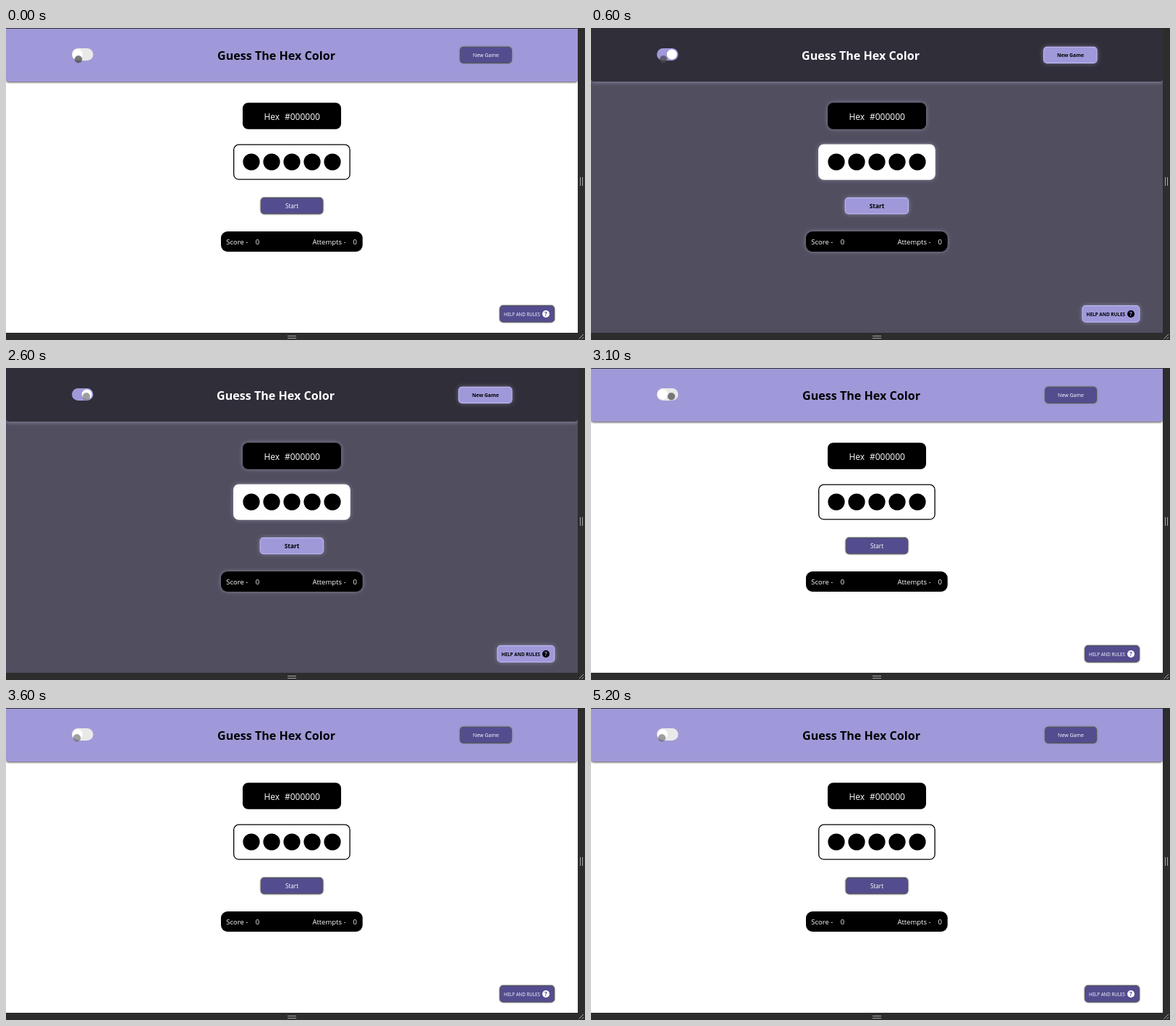
These frames come from a looping animation (800 px wide and 431 px high, 5600 ms). An HTML page:

```html
<!DOCTYPE html>
<html lang="en">
<head>
<meta charset="utf-8">
<title>Guess The Hex Color</title>
<style>
  html, body { margin: 0; height: 100%; overflow: hidden; background: #2d2d2d; }
  svg { display: block; width: 100vw; height: 100vh; font-family: "Open Sans", "Noto Sans", sans-serif; }
  text { white-space: pre; }
  .light .header { filter: drop-shadow(0 1.5px 1.5px #444); }
  .light .button { filter: drop-shadow(0 0 .8px #777); }
  .dark .header { filter: drop-shadow(0 2px 2.5px #aaa6c080); }
  .dark .glow, .dark .button { filter: drop-shadow(0 0 3px #c8c4e470); }
</style>
</head>
<body>
<svg id="stage" viewBox="0 0 800 431" preserveAspectRatio="none"></svg>
<script>
const LOOP = 5600;
const stage = document.getElementById("stage");

const rect = (x, y, w, h, r, fill, extra = "") =>
  `<rect x="${x}" y="${y}" width="${w}" height="${h}" rx="${r}" fill="${fill}" ${extra}/>`;
const circle = (x, y, r, fill) => `<circle cx="${x}" cy="${y}" r="${r}" fill="${fill}"/>`;
const label = (text, x, y, size, fill, weight = 400, anchor = "middle") =>
  `<text x="${x}" y="${y}" font-size="${size}" fill="${fill}" font-weight="${weight}" text-anchor="${anchor}">${text}</text>`;
const white = (text, x, y, size) => label(text, x, y, size, "#fff", 400, "start");

const themes = {
  light: {
    page: "#fff", header: "#9f99d9", title: "#000", titleX: 373.5,
    track: "#e9e9e9", knobX: 99, panelLine: "#000",
    button: "#534d8f", buttonLine: "#565660", text: "#fff", weight: 400, icon: "#fff",
    newGame: [627.5, 71], start: [352.3, 85.4], help: [682.5, 75], sizes: [7, 8.2, 6.23], newX: 663, helpX: 713
  },
  dark: {
    page: "#504e5f", header: "#2f2e39", title: "#fff", titleX: 372.5,
    track: "#9f99d9", knobX: 111.7, panelLine: "#fff",
    button: "#9f99d9", buttonLine: "#bbb5f3", text: "#000", weight: 700, icon: "#000",
    newGame: [625.5, 73.5], start: [351.2, 87.3], help: [679, 78.8], sizes: [6.9, 8.3, 6.4], newX: 662.5, helpX: 711.3
  }
};

function drawTheme(name) {
  const c = themes[name];
  const button = ([x, w], y, h) =>
    rect(x, y, w, h, 4.5, c.button, `class="button" stroke="${c.buttonLine}" stroke-width="1.2"`);
  const caption = (text, x, y, size) => label(text, x, y, size, c.text, c.weight);
  const dots = [0, 1, 2, 3, 4].map(i => circle(339 + 28 * i, 185, 11.6, "#000")).join("");
  return `<g id="${name}" class="${name}" clip-path="url(#page)">` +
    rect(0, 1, 790, 420, 0, c.page) +
    rect(0, -8, 790, 82, 4, c.header, 'class="header"') +
    rect(91, 28, 29.5, 17, 8.5, c.track) + circle(c.knobX, 36.4, 7, "#fff") +
    label("Guess The Hex Color", c.titleX, 44, 16.1, c.title, 700) +
    button(c.newGame, 26.3, 22) + caption("New Game", c.newX, 40, c.sizes[0]) +
    rect(327, 103.3, 136, 36.4, 7.5, "#000", 'class="glow"') +
    white("Hex", 356.5, 127, 12) + white("#000000", 385, 127, 12) +
    rect(314.7, 161.2, 160.4, 48, 7, "#fff", `class="glow" stroke="${c.panelLine}" stroke-width="1.3"`) + dots +
    button(c.start, 234.6, 22) + caption("Start", 395, 248.7, c.sizes[1]) +
    rect(297, 281, 195.7, 28, 9, "#000", 'class="glow"') +
    white("Score -", 304.3, 299, 9.5) + white("0", 344.8, 299, 9.5) +
    white("Attempts -", 423.4, 299, 9.5) + white("0", 479.6, 299, 9.5) +
    button(c.help, 383.6, 22.6) + caption("HELP AND RULES", c.helpX, 397.5, c.sizes[2]) +
    circle(746, 395, 5, c.icon) + label("?", 746, 398, 8, c.button, 700) +
    "</g>";
}

const line = d => `<path d="${d}" stroke="#a8a8a8" fill="none"/>`;
stage.innerHTML =
  '<clipPath id="page"><rect y="1" width="790" height="420"/></clipPath>' +
  rect(0, 0, 800, 431, 0, "#2d2d2d") +
  drawTheme("light") + drawTheme("dark") +
  line("M793.5 206V218M796.5 206V218M389 425.5H401M389 428.5H401M791.5 429.5L798 423M795.5 429.5L798 427") +
  '<circle id="touch" r="5" fill="#464646" stroke="#555" stroke-width=".5"/>';

const [light, dark, touch] = ["light", "dark", "touch"].map(id => document.getElementById(id));

function touchAt(t) {
  if (t < 2600) return { x: 100, y: 43.2, opacity: .72 };
  const move = Math.min(1, Math.max(0, Math.floor((t - 3100) / 100) / 5));
  const pressed = t >= 3100 && t < 3600;
  return { x: 111 - 13 * move, y: 39.3 + 2 * move, opacity: pressed ? .7 : .52 };
}

function render(now) {
  const t = now % LOOP;
  const isDark = t >= 600 && t < 3100;
  light.style.display = isDark ? "none" : "";
  dark.style.display = isDark ? "" : "none";
  const { x, y, opacity } = touchAt(t);
  touch.setAttribute("cx", x);
  touch.setAttribute("cy", y);
  touch.setAttribute("opacity", opacity);
  requestAnimationFrame(render);
}
render(performance.now());
</script>
</body>
</html>
```
